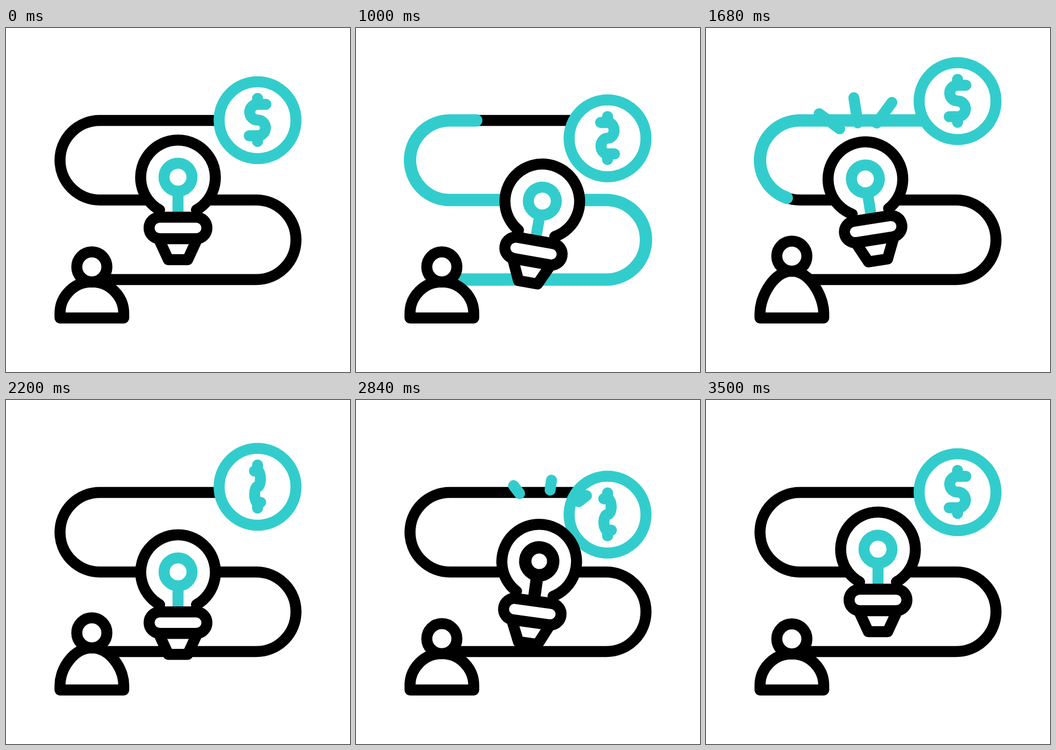
These frames come from a looping animation (640 by 640 pixels, 3.6 s). An HTML page:

```html
<!DOCTYPE html>
<html lang="en">
<head>
<meta charset="utf-8">
<title>Idea to money</title>
<style>
  html, body { margin: 0; width: 100%; height: 100%; overflow: hidden; background: #fff; }
  svg { display: block; width: 640px; height: 640px; }
  .line { fill: none; stroke: #000; stroke-width: 20.5; }
  .solid { fill: #fff; }
  .teal { stroke: #3cc; }
  .round { stroke-linecap: round; stroke-linejoin: round; }
  .trim { stroke-width: 23; stroke-linecap: round; }
  #dollar { vector-effect: non-scaling-stroke; }
</style>
</head>
<body>
<svg viewBox="0 0 640 640">
  <path id="route" class="line" d="M160 468H465.5A74 74 0 0 0 465.5 320H174.5A74 74 0 0 1 174.5 172H427"/>
  <path id="flow" class="line teal trim"/>

  <path id="body" class="line solid round"/>
  <circle id="head" class="line solid" cx="159.7" r="28"/>

  <g id="coin">
    <circle class="line solid teal" r="71.5"/>
    <path id="dollar" class="line teal round"
      d="M0-40.5V-29.5M15.5-29.5H0A14.5 14.5 0 0 0 0-.3A14.5 14.5 0 0 1 0 29H-15.5M0 29V39.5"/>
  </g>

  <g id="bulb">
    <path class="line solid round" d="M285.7 338.5A69.5 69.5 0 1 1 354.3 338.5"/>
    <path id="filament" class="line teal" d="M320 352V303.5A26 26 0 0 1 320 251.5A26 26 0 0 1 320 303.5"/>
    <path id="spark" class="line trim"/>
    <path class="line solid round" d="M284 392L302 431H338L356 392"/>
    <rect class="line solid" x="266.2" y="352" width="107.6" height="40" rx="20"/>
    <g id="rays"></g>
  </g>
</svg>
<script>
const $ = id => document.getElementById(id);
const LOOP = 3600;

const clamp = (v, low, high) => Math.min(high, Math.max(low, v));
const ease = u => u * u * (3 - 2 * u);
const ramp = (t, from, to) => ease(clamp((t - from) / (to - from), 0, 1));

// Rises from 0 to 1 and falls back
const pulse = (t, start, peak, end) => ramp(t, start, peak) - ramp(t, peak, end);

// Goes to high, dips to low and back, then returns to rest
function swing(t, high, low, first, half, end) {
  const second = first + 2 * half;
  return high * (ramp(t, 0, first) - ramp(t, second, end))
    + (low - high) * pulse(t, first, first + half, second);
}

// Shows the part of a unit-length path between its moving tail and head
function trim(el, t, start, middle, end) {
  const head = ramp(t, start, middle), tail = ramp(t, middle, end);
  const shown = head - tail > 0.0001;
  el.style.display = shown ? '' : 'none';
  if (shown) {
    el.setAttribute('stroke-dasharray', `${head - tail} 2`);
    el.setAttribute('stroke-dashoffset', -tail);
  }
}

function setUnitPath(el, d) {
  el.setAttribute('d', d);
  el.setAttribute('pathLength', 1);
  return el;
}
setUnitPath($('flow'), $('route').getAttribute('d'));
setUnitPath($('spark'), $('filament').getAttribute('d'));

const rays = [-1, 0, 1].map(side => {
  const ray = document.createElementNS('http://www.w3.org/2000/svg', 'path');
  const angle = side * Math.PI / 4, length = 53;
  ray.setAttribute('class', 'line teal round');
  setUnitPath(ray, `M${322 + 31 * side} ${178 + 4 * Math.abs(side)}` +
    `l${length * Math.sin(angle)} ${-length * Math.cos(angle)}`);
  return $('rays').appendChild(ray);
});

function draw(t) {
  trim($('flow'), t, 400, 1200, 2000);
  trim($('spark'), t, 2200, 2800, 3400);
  const burst = 200 + 1000 * clamp(Math.floor((t - 200) / 1000), 0, 2);
  rays.forEach(ray => trim(ray, t, burst, burst + 400, burst + 800));

  const drop = 50 * (pulse(t, 0, 800, 1600) + pulse(t, 1600, 2400, 3200));
  const tilt = swing(t, 10, -10, 1000, 800, 3400);
  $('bulb').setAttribute('transform', `translate(0 ${drop}) rotate(${tilt} 320 431)`);

  const coinY = 171.5 + swing(t, 42.2, -38.6, 800, 1000, 3500);
  const spin = 1 - 2 * (pulse(t, 0, 850, 1700) + pulse(t, 1700, 2500, 3500));
  $('coin').setAttribute('transform', `translate(468 ${coinY})`);
  $('dollar').setAttribute('transform', `scale(${spin || 0.001} 1)`);

  const lift = 12 * pulse(t, 2800, 3150, 3500) + 22.3 *
    (pulse(t, 0, 400, 800) + pulse(t, 1200, 1600, 2000) + pulse(t, 2000, 2400, 2800));
  const top = 472.3 - lift;
  $('head').setAttribute('cy', 444.5 - lift);
  $('body').setAttribute('d',
    `M100.5 531C100.5 498.4 127 ${top} 159.7 ${top}S219 498.4 219 531V539.5H100.5Z`);
}

const begin = performance.now();
function tick() {
  draw((performance.now() - begin) % LOOP);
  requestAnimationFrame(tick);
}
tick();
</script>
</body>
</html>
```
